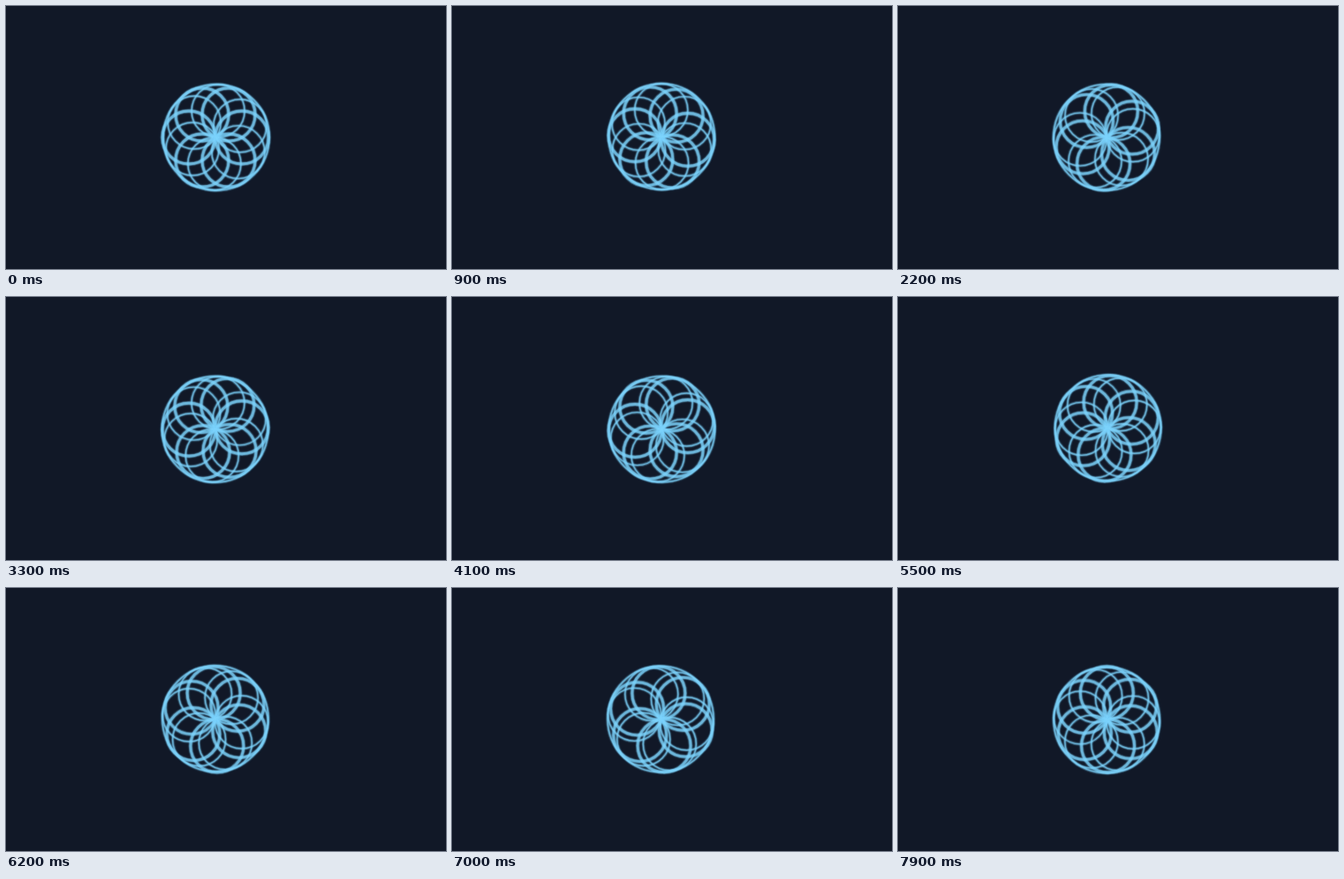
These frames come from a looping animation (498 px wide and 298 px high, 8 s). An HTML page with a canvas:

```html
<!DOCTYPE html>
<html lang="en">
<head>
<meta charset="utf-8">
<title>Rosette</title>
<style>
html, body { margin: 0; width: 100%; height: 100%; overflow: hidden; background: #111827; }
canvas { display: block; }
</style>
</head>
<body>
<canvas id="stage" width="498" height="298"></canvas>
<script>
const ctx = document.getElementById('stage').getContext('2d');
const LOOP = 8000, STEP = 100;
const CX = 237, CY = 149, PETAL = 30, PETALS = 6;
const TAU = Math.PI * 2, DEG = TAU / 360;
const SPEED = TAU / 5000;

// A soft line: a faint wide stroke under a stronger narrow one.
function ring(x, y, radius, width) {
  ctx.beginPath();
  ctx.arc(x, y, radius, 0, TAU);
  ctx.globalAlpha = 0.2;
  ctx.lineWidth = width + 1.6;
  ctx.stroke();
  ctx.globalAlpha = 0.55;
  ctx.lineWidth = width;
  ctx.stroke();
}

function flower(x, y, turn, width) {
  for (let i = 0; i < PETALS; i++) {
    const a = turn + i * TAU / PETALS;
    ring(x + PETAL * Math.cos(a), y + PETAL * Math.sin(a), PETAL, width);
  }
}

function draw(time) {
  const turn = time * SPEED;
  ctx.globalAlpha = 1;
  ctx.shadowBlur = 0;
  ctx.fillStyle = '#111827';
  ctx.fillRect(0, 0, 498, 298);

  ctx.strokeStyle = ctx.shadowColor = '#7dd3fc';
  ctx.shadowBlur = 2;
  flower(CX, CY, turn, 2.8);

  // The counter-rotating layer turns about a slightly off-centre pivot.
  const tilt = -turn - 10 * DEG;
  const x = CX + Math.cos(tilt), y = CY + Math.sin(tilt);
  flower(x, y, 34 * DEG - turn, 1.4);
  ring(x, y, PETAL * 2, 1.6);
}

function tick() {
  const time = performance.now() % LOOP;
  draw(Math.floor(time / STEP) * STEP);
  requestAnimationFrame(tick);
}
tick();
</script>
</body>
</html>
```
